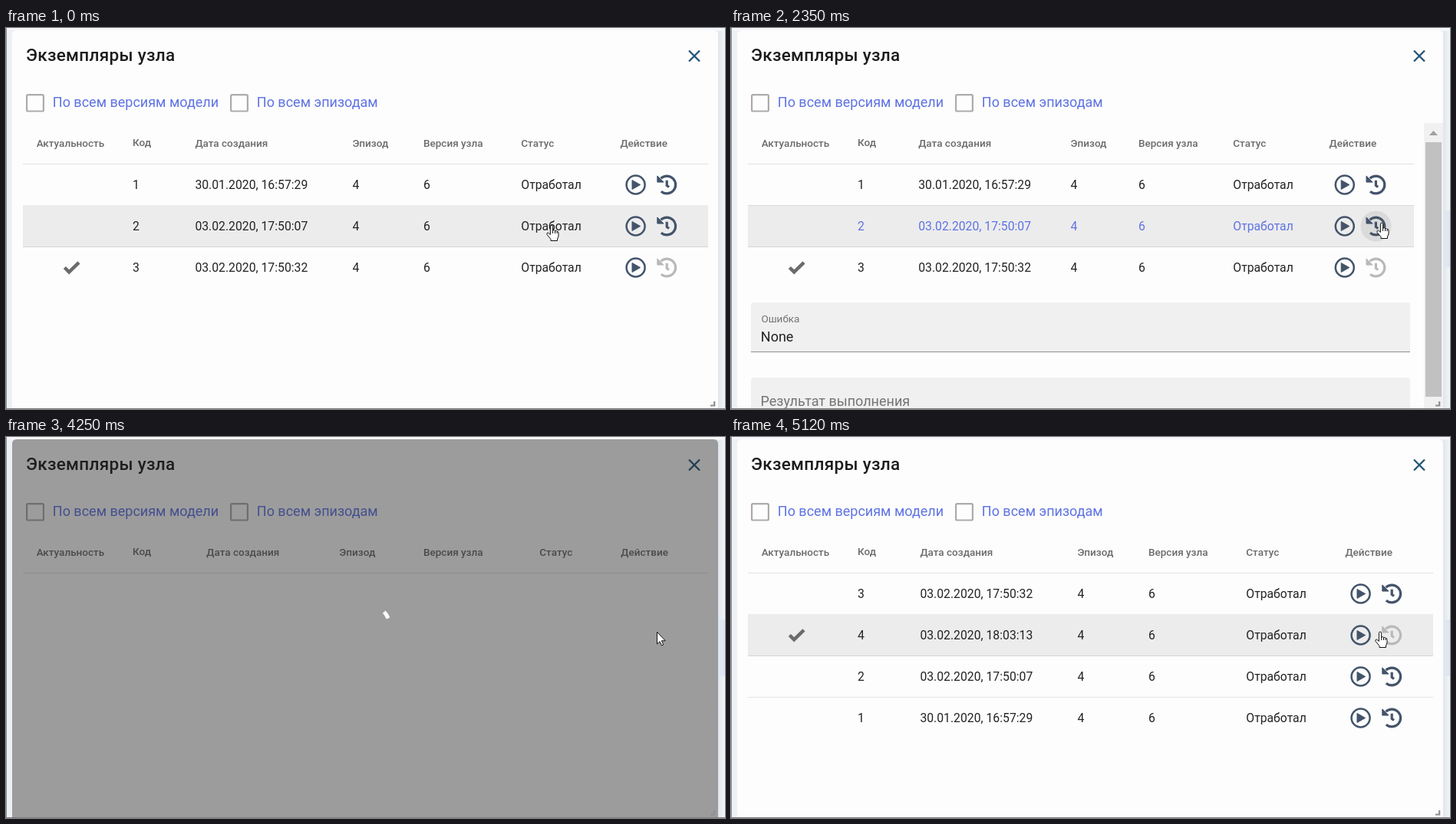
These frames come from a looping animation (937x497 px, 6.17 s). An HTML page:

```html
<!DOCTYPE html>
<html lang="ru">
<head>
<meta charset="utf-8">
<title>Экземпляры узла</title>
<style>
html, body { margin: 0; width: 100%; height: 100%; overflow: hidden; background: #edf1f5; }
svg { display: block; width: 937px; height: 497px; }
text { font-family: Roboto, Arial, sans-serif; white-space: pre; }
.title { font-size: 22.5px; font-weight: 500; letter-spacing: .0125em; fill: #1c1c1c; }
.label { font-size: 18px; fill: #5f73e3; }
.head { font-size: 13.5px; font-weight: 500; fill: #6b6b6b; }
.cell { font-size: 15.75px; fill: #232323; }
.active .cell { fill: #5f73e3; }
.small { font-size: 13.5px; fill: #747474; }
.value { font-size: 18px; fill: #232323; }
.hint { font-size: 18px; fill: #747474; }
</style>
</head>
<body>
<svg viewBox="0 0 937 497">
  <defs>
    <linearGradient id="edge"><stop stop-color="#e0e6eb"/><stop offset="1" stop-color="#f1f5f8"/></linearGradient>
    <g id="play">
      <circle r="12" fill="none" stroke="#43546a" stroke-width="2.5"/>
      <path d="M-4.6-6L6 0L-4.6 6Z" fill="#43546a" stroke="#43546a" stroke-linejoin="round"/>
    </g>
    <g id="history">
      <path d="M-7.4 8.7A11.4 11.4 0 1 0-7.8-8.3M0-5.8V.9L2.8 3.1" fill="none" stroke="currentColor" stroke-width="3.2"/>
      <path d="M-12.4-11.6V-3.4H-4.2Z" fill="currentColor" stroke="currentColor" stroke-linejoin="round"/>
    </g>
    <path id="check" d="M-8.6-.2L-2.8 5.6L10-6.9" fill="none" stroke="#6b6b6b" stroke-width="4.5"/>
    <rect id="box" width="21.8" height="21.4" rx="1.5" fill="none" stroke="#adabab" stroke-width="2.2"/>
  </defs>

  <rect width="937" height="497" fill="#edf1f5"/>
  <rect width="937" height="3" fill="#f5f7f9"/>
  <rect x="928" y="4" width="9" height="493" fill="url(#edge)"/>
  <rect id="tint" x="928" y="238" width="9" height="74" fill="#dfe8f1"/>
  <rect x="8" y="3" width="920" height="500" rx="6" fill="#fdfdfd"/>

  <text class="title" x="26" y="43">Экземпляры узла</text>
  <path d="M890 29.5L904 43.5M904 29.5L890 43.5" stroke="#1f5274" stroke-width="2.2"/>
  <use href="#box" x="27.1" y="87.1"/>
  <text class="label" x="60.8" y="103">По всем версиям модели</text>
  <use href="#box" x="293.1" y="87.1"/>
  <text class="label" x="326.8" y="103">По всем эпизодам</text>

  <g id="tables"></g>

  <path id="dim" d="M8 497V9Q8 3 14 3H922Q928 3 928 9V497Z" fill="#212121"/>
  <circle id="spinner" r="33.5" pathLength="125.66" fill="none" stroke="#fff" stroke-width="5"/>
  <path d="M918 492.5H923.2V487" fill="none" stroke="#8e8e8e" stroke-width="2.2"/>
  <path d="M.5 0V497" stroke="#8c8c8c"/>
  <path d="M0 496.5H937" stroke="#7d7d7d"/>

  <g id="hand" fill="#fff" stroke="#111" stroke-linejoin="round">
    <path d="M-1.6 1.6Q-1.6.2 0 .2T1.6 1.6V7Q3.6 6 4.5 7.6Q6.5 6.8 7 8.4Q9 8 9 10.5V14Q9 16 7.5 18V20.5H-1V18.5L-6 12.5Q-6.5 10-4.5 10L-1.6 12.5Z"/>
    <path d="M1.6 7V11M4.5 7.6V11M7 8.4V11" fill="none"/>
  </g>
  <path id="arrow" d="M.5.5V16L4 12.8L6.4 18L8.7 17L6.4 11.8H11.3Z" fill="#fff" stroke="#111"/>
</svg>
<script>
const $ = id => document.getElementById(id);
const LOOP = 6170;
const HEADS = ['Актуальность', 'Код', 'Дата создания', 'Эпизод', 'Версия узла', 'Статус', 'Действие'];
const RUNS = {
  1: '30.01.2020, 16:57:29',
  2: '03.02.2020, 17:50:07',
  3: '03.02.2020, 17:50:32',
  4: '03.02.2020, 18:03:13'
};
const WIDE = [39.7, 165, 246.4, 451.4, 544, 671.3, 800.4];
const NARROW = [39.7, 165, 244.2, 442.5, 531, 654.3, 779.6];
const EMPTY = [39.7, 165, 261.3, 434.3, 544, 695.3, 801.3];

const text = (cls, x, y, s) => `<text class="${cls}" x="${x}" y="${y}">${s}</text>`;
const rect = (x, y, w, h, fill, extra = '') =>
  `<rect x="${x}" y="${y}" width="${w}" height="${h}" fill="${fill}" ${extra}/>`;
const use = (id, x, y, color = '#43546a') =>
  `<use href="#${id}" x="${x}" y="${y}" color="${color}"/>`;

function row(code, i, cols, current, active) {
  const mid = 204.5 + 54 * i;
  const cells = [code, RUNS[code], 4, 6, 'Отработал'];
  return `<g class="${active ? 'active' : ''}">` +
    cells.map((s, k) => text('cell', cols[k + 1], mid + 5.5, s)).join('') +
    (code === current ? use('check', 85, mid + .2) : '') +
    use('play', cols[6] + 20.2, mid) +
    use('history', cols[6] + 60.8, mid, code === current ? '#b9b9b9' : '#43546a') + '</g>';
}

function table(id, cols, codes, current, open, extra = '') {
  const width = open ? 868 : 893;
  const line = (y, c) => rect(22, y, width, 1, c);
  let s = HEADS.map((h, k) => text('head', cols[k], k === 1 ? 154 : 155, h)).join('');
  s += line(177, '#e2e2e2');
  if (codes.length) {
    s += rect(22, 231, width, 54, '#ececec') + line(285, '#d5d5d5');
    if (open) s += line(231, '#dcdcdc');
    if (codes.length > 3) s += line(339, '#e6e6e6');
  }
  s += extra + codes.map((c, i) => row(c, i, cols, current, open && i === 1)).join('');
  return `<g id="${id}">${s}</g>`;
}

const details =
  '<circle id="halo" cx="840.5" cy="258.5" r="20" fill="#dadada"/>' +
  '<path d="M26 423V362Q26 358 30 358H881Q885 358 885 362V423Z" fill="#f0f0f0"/>' +
  rect(26, 422, 859, 1, '#8e8e8e') +
  text('small', 39.4, 384, 'Ошибка') + text('value', 38.8, 409, 'None') +
  '<path d="M26 497V460Q26 456 30 456H881Q885 456 885 460V497Z" fill="#f0f0f0"/>' +
  text('hint', 38.5, 493, 'Результат выполнения') +
  rect(903, 124, 25, 373, '#f1f1f1') + rect(905, 149, 21, 332, '#c1c1c1') +
  '<path d="M910 140L915.5 134L921 140Z" fill="#a0a0a0"/>';

$('tables').innerHTML =
  table('before', WIDE, [1, 2, 3], 3, false) +
  table('open', NARROW, [1, 2, 3], 3, true, details) +
  table('empty', EMPTY, [], 0, false) +
  table('after', WIDE, [3, 4, 2, 1], 4, false);

// Step tables: [start, ...values], each held until the next start
const SCENES = [[0, 'before'], [690, 'open'], [3030, 'empty'], [4640, 'after']];
const POINTER = [
  [0, 'hand', 711, 257], [1210, 'hand', 752, 264], [1330, 'hand', 823, 268],
  [1480, 'hand', 848, 254], [3030, 'arrow', 850, 254], [3650, 'arrow', 848, 254],
  [4640, 'hand', 846, 254]
];
const DIM = [
  [0, 0], [3030, .13], [3150, .25], [3270, .34], [3390, .4], [3510, .44],
  [4640, .39], [4760, .32], [4880, .24], [5000, .12], [5120, 0]
];
const HOVER = [[0, 0], [1620, .2], [1740, .4], [1860, .6], [1990, .75], [2110, .87], [2230, .95], [2350, 1]];

const at = (steps, t) => steps.filter(s => s[0] <= t).pop();
const show = (id, on) => $(id).setAttribute('visibility', on ? 'visible' : 'hidden');
const smooth = x => x * x * (3 - 2 * x);

function spin(t) {
  const on = t >= 3030 && t < 4640;
  show('spinner', on);
  if (!on) return;
  const held = 3030 + Math.floor((t - 3029) / 121.67) * 121.67;
  const p = (held - 2990) * 1.04 / 1400 % 1;
  const grow = smooth(Math.min(1, p * 2));
  const chase = smooth(Math.max(0, p * 2 - 1));
  const el = $('spinner');
  el.setAttribute('stroke-dasharray', `${1 + 99 * grow} 200`);
  el.setAttribute('stroke-dashoffset', -(15 * grow + 110 * chase));
  el.setAttribute('transform', `translate(467.5 250) rotate(${360 * p})`);
}

function draw(t) {
  const scene = at(SCENES, t)[1];
  SCENES.forEach(s => show(s[1], s[1] === scene));
  const [, shape, x, y] = at(POINTER, t);
  ['hand', 'arrow'].forEach(id => show(id, id === shape));
  $(shape).setAttribute('transform', `translate(${x} ${y})`);
  const hover = at(HOVER, t)[1];
  $('halo').setAttribute('opacity', hover);
  $('tint').setAttribute('opacity', hover);
  $('dim').setAttribute('opacity', at(DIM, t)[1]);
  spin(t);
}

const start = performance.now();
function tick() {
  draw((performance.now() - start) % LOOP);
  requestAnimationFrame(tick);
}
tick();
</script>
</body>
</html>
```
